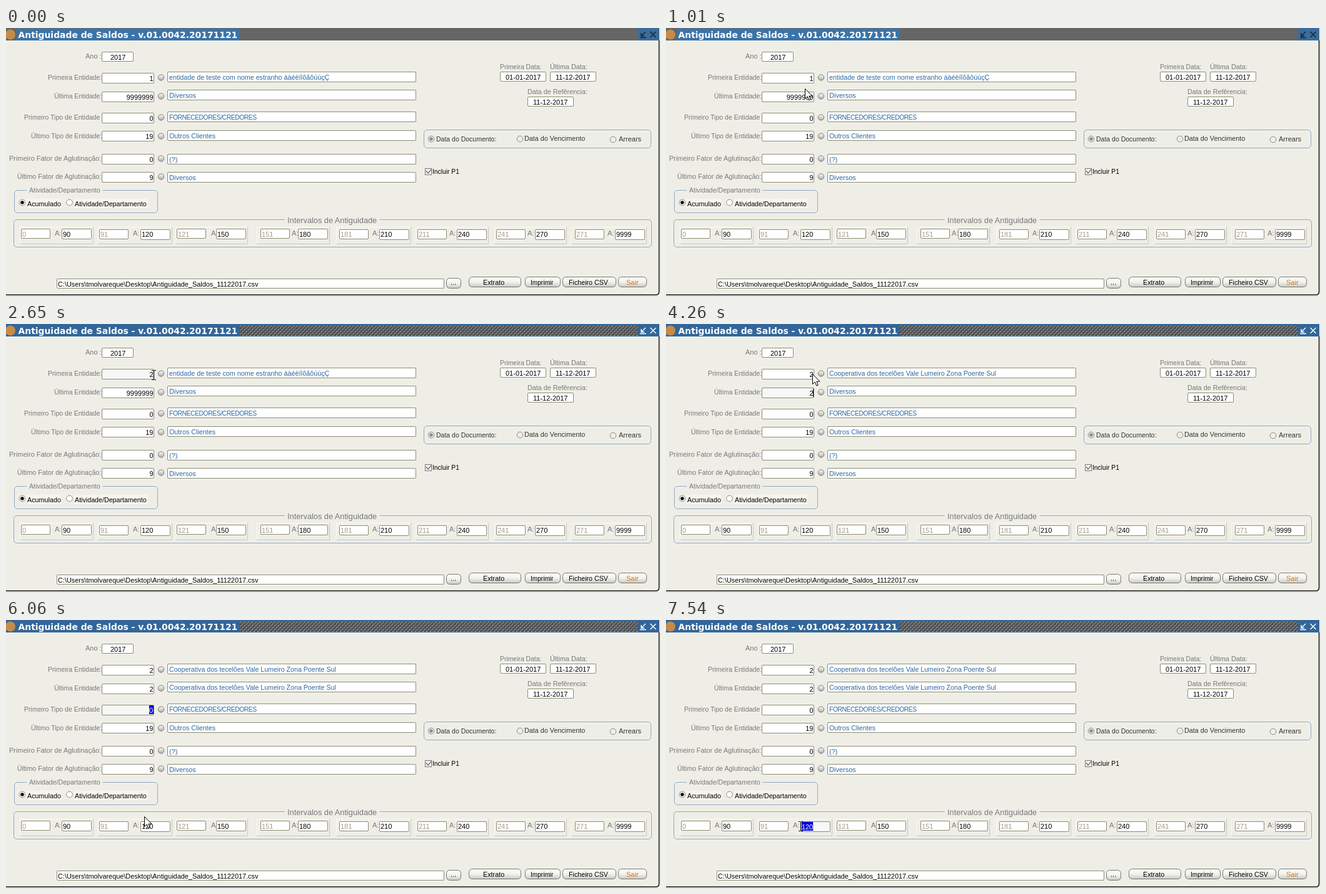
An HTML page that plays this animation: 1046 by 430 pixels, repeating every 8000 ms.

```html
<!DOCTYPE html>
<html lang="pt">
<head>
<meta charset="utf-8">
<title>Antiguidade de Saldos</title>
<style>
  html, body { margin: 0; width: 100%; height: 100%; overflow: hidden; background: #fff; }
  svg { display: block; width: 1046px; height: 430px; font-family: "Liberation Sans", Arial, sans-serif; }
  text { white-space: pre; }
  .title { font: bold 13.9px "DejaVu Sans", Verdana, sans-serif; }
  .caps { letter-spacing: -.4px; }
</style>
</head>
<body>
<svg id="stage" viewBox="0 0 1046 430"></svg>
<script>
const LOOP = 8000;
const LABEL = '#77777a', BLUE = '#2c68a4', BLACK = '#000', EDGE = '#8c8d76';
const FOCUS = '#f7f7f7', SELECT = '#0000dc', BG = '#efeee6', GROUP = '#8ea9c4';
const UNION = 'Cooperativa dos tecelões Vale Lumeiro Zona Poente Sul';

const text = (x, y, str, size = 11, fill = LABEL, more = '') =>
  `<text x="${x}" y="${y}" font-size="${size}" fill="${fill}" ${more}>${str}</text>`;
const rect = (x, y, w, h, fill, more = '') =>
  `<rect x="${x}" y="${y}" width="${w}" height="${h}" fill="${fill}" ${more}/>`;
const field = (x, y, w, h = 16, more = '') =>
  rect(x + .5, y + .5, w - 1, h - 1, '#fff', `rx="1.5" stroke="${EDGE}" ${more}`);
const numberText = (y, str, id = '', fill = BLACK) =>
  text(235.5, y, str, 11, fill, `text-anchor="end" ${id && `id="${id}"`}`);
const group = (x, y, w, h) =>
  rect(x + .5, y + .5, w - 1, h - 1, 'none', `rx="5" stroke="${GROUP}"`);
const radio = (x, y, dot, fill = '#fff') =>
  `<circle cx="${x}" cy="${y}" r="4.8" fill="${fill}" stroke="#8b8b8b"/>` +
  (dot ? `<circle cx="${x}" cy="${y}" r="2.8" fill="${dot}"/>` : '');
const button = (x, y, w, label, tx, size, fill = BLACK) =>
  rect(x + .5, y + .5, w - 1, 16, 'url(#button)', 'rx="5" stroke="#77776f"') +
  text(tx, 412, label, size, fill);
const selection = (id, x, y, w, str) =>
  `<g id="${id}" visibility="hidden">${rect(x, y, w, 14, SELECT)}${text(x, y + 12, str, 11, '#fff')}</g>`;

function titleBar() {
  return rect(0, 0, 1045, 20, '#666', 'id="bar"') +
    rect(374, 2, 637, 17, 'url(#bumps)', 'id="texture"') +
    rect(17, 1, 356, 19, '#3a74aa', 'id="strip"') +
    rect(1011, 0, 34, 20, '#3b6c9c', 'id="controls"') +
    '<circle cx="7" cy="10.5" r="8" fill="#c58b4c"/>' +
    text(19.5, 16, 'Antiguidade de Saldos - v.01.0042.20171121', 13.9, '#fff', 'class="title"') +
    '<path id="icons" d="M1023 6l-6 6M1016 8v5h5M1014 15.500h10M1030.500 6l9 9M1039.500 6l-9 9" fill="none" stroke-width="1.500"/>';
}

// label, x, size, label y, field y, number y, name field y, name y, number, name, name size
const rows = [
  ['Primeira Entidade:', 67, 10.5, 83, 72, 85, 70, 83, '1', 'entidade de teste com nome estranho áàéèíîõãôúùçÇ', 10.75],
  ['Última Entidade:', 77, 10.4, 113, 102, 115, 99, 112, '9999999', 'Diversos', 11],
  ['Primeiro Tipo de Entidade', 29, 10.55, 147, 136, 149, 134, 147, '0', 'FORNECEDORES/CREDORES', 10.3],
  ['Último Tipo de Entidade:', 40, 10.4, 177, 165, 178, 164, 177, '19', 'Outros Clientes', 10.75],
  ['Primeiro Fator de Aglutinação:', 5, 10.95, 213, 202, 215, 202, 215, '0', '(?)', 11],
  ['Último Fator de Aglutinação:', 18, 10.7, 242, 231, 244, 231, 244, '9', 'Diversos', 11]
];
const entityRow = ([label, lx, size, ly, fy, ny, nameTop, nameY, num, name, nameSize], i) =>
  text(lx, ly, label, size) +
  field(153, fy, 84, 17, `id="field${i}"`) + numberText(ny, num, 'num' + i) +
  `<circle cx="248" cy="${ly - 3.5}" r="4.6" fill="url(#knob)" stroke="#77776f"/>` +
  field(258, nameTop, 398, 17) +
  text(261, nameY, name, nameSize, BLUE, `id="name${i}" ${i === 2 ? 'class="caps"' : ''}`);

function dates() {
  return text(790, 66, 'Primeira Data:', 10.4) + text(870, 66, 'Última Data:', 10.9) +
    text(834, 106, 'Data de Refêrencia:', 10.8) +
    [[790, 70, '01-01-2017'], [870, 70, '11-12-2017'], [834, 110, '11-12-2017']]
      .map(([x, y, d]) => field(x, y, 74) + text(x + 9, y + 13, d, 11, BLACK)).join('');
}

function options() {
  return group(668, 163, 364, 30) +
    radio(680, 178, '#8d8d8d', BG) + text(688, 182, 'Data do Documento:', 10.5, '#333') +
    radio(822, 178, '', BG) + text(829, 181, 'Data do Vencimento', 10.8, '#333') +
    radio(971, 179, '', BG) + text(980, 182, 'Arrears', 11, '#333') +
    rect(670.5, 225.5, 10, 10, '#f7f7f2', 'stroke="#777"') +
    '<path d="M672 229l3 4 6-7" fill="none" stroke="#777" stroke-width="1.500"/>' +
    text(682, 234, 'Incluir P1', 10.3, BLACK) +
    group(13, 260, 230, 37) + rect(33, 258, 121, 6, BG) +
    text(37, 264, 'Atividade/Departamento', 10.6) +
    rect(33, 274, 55, 15, '#f6f5ef') + rect(109, 274, 117, 15, '#f6f5ef') +
    radio(26, 280, '#111') + text(34, 286, 'Acumulado', 10.8, BLACK) +
    radio(101.5, 280) + text(110, 286, 'Atividade/Departamento', 10.7, BLACK);
}

// panel left, start field, "A:" and end field
const spans = [
  [22, 24, 78, 89], [147, 149, 203, 215], [271, 273, 328, 336], [401, 407, 457, 467],
  [528, 533, 586, 597], [655, 658, 709, 721], [781, 784, 834, 846], [904, 910, 962, 974]
];
const limits = [0, 90, 120, 150, 180, 210, 240, 270, 9999];
function intervals() {
  return group(12, 307, 1021, 45) + rect(446, 304, 152, 8, BG) +
    text(450, 313, 'Intervalos de Antiguidade', 12.75) +
    spans.map(([left, from, mid, to], i) => {
      const y = i === 0 || i === 2 || i === 3 ? 322 : 323, right = to + 50;
      return `<path d="M${left}.500 346V319.500H${right}" fill="none" stroke="#fafaf6"/>` +
        `<path d="M${left} 346.500H${right}.500V319" fill="none" stroke="#c9c8c0"/>` +
        field(from, y, 47) +
        text(from + 2, 335, i ? limits[i] + 1 : 0, 11, '#a39a88') +
        text(mid, 333, 'A:') +
        field(to, y, 48, 17, `id="limit${i}"`) + text(to + 2, 335, limits[i + 1], 11, BLACK);
    }).join('');
}

function footer() {
  return field(81, 402, 620) +
    text(83, 415, 'C:\\Users\\tmolvareque\\Desktop\\Antiguidade_Saldos_11122017.csv', 10.9, BLACK) +
    button(704, 401, 24, '...', 711, 11) + button(740, 399, 84, 'Extrato', 763, 10.8) +
    button(830, 399, 57, 'Imprimir', 839, 10.1) + button(890, 399, 86, 'Ficheiro CSV', 900, 10.7) +
    button(979, 399, 46, 'Sair', 992, 11, '#d07818');
}

const defs = `<defs>
  <linearGradient id="button" x2="0" y2="1"><stop stop-color="#fff"/><stop offset=".5" stop-color="#f1f1ee"/><stop offset="1" stop-color="#c9c9c4"/></linearGradient>
  <linearGradient id="knob" x2="0" y2="1"><stop stop-color="#fff"/><stop offset="1" stop-color="#aaa"/></linearGradient>
  <pattern id="bumps" width="6" height="6" patternUnits="userSpaceOnUse">
    ${rect(0, 0, 6, 6, '#5c5f62')}${rect(0, 0, 2, 1, '#b4b7ba')}${rect(1, 1, 2, 1, '#222')}
    ${rect(3, 3, 2, 1, '#b4b7ba')}${rect(4, 4, 2, 1, '#222')}
  </pattern></defs>`;

const pointers =
  '<path id="arrow" d="M.500 .500V16.500L4.300 13 6.800 19 9.300 18 6.800 12.200H12Z" fill="#fff" stroke="#000"/>' +
  '<path id="beam" d="M-3 -7.500H0M1 -7.500H4M.500 -7V7M-3 7.500H0M1 7.500H4" fill="none" stroke="#000" stroke-width="1.200"/>';

const stage = document.getElementById('stage');
stage.innerHTML = defs + rect(0, 0, 1044, 428, BG) +
  '<path d="M0 428.200H1040Q1044.500 428 1044.500 423V20" fill="none" stroke="#111" stroke-width="1.500"/>' +
  titleBar() +
  text(127, 49, 'Ano :') + field(153, 38, 51) + text(167, 51, '2017', 11, BLACK) +
  rows.map(entityRow).join('') + dates() + options() + intervals() + footer() +
  selection('sel0', 229, 73, 7, '1') + selection('sel1', 193, 103, 43, '9999999') +
  selection('sel2', 229, 137, 7, '0') +
  [...'120'].map((d, i) => selection('digit' + i, 217 + 6 * i, 324, 6.2, d)).join('') +
  rect(235, 104, 1, 13, BLACK, 'id="caret"') + pointers;

const get = id => document.getElementById(id);
const show = (id, on) => get(id).setAttribute('visibility', on ? 'visible' : 'hidden');
const paint = (id, attr, value) => get(id).setAttribute(attr, value);
const within = (t, a, b) => t >= a && t < b;

// start, end, steps, pointer, from x y, to x y
const moves = [
  [70, 380, 5, 'arrow', 780, 338, 218, 140],
  [680, 1010, 5, 'arrow', 217, 154, 222, 97],
  [1090, 1400, 5, 'arrow', 223, 94, 227, 81],
  [1550, 1870, 5, 'beam', 230, 82, 236, 82],
  [3170, 3170, 1, 'arrow', 234, 80, 234, 80],
  [5190, 5660, 7, 'arrow', 234, 84, 221, 313],
  [6060, 6060, 1, 'arrow', 221, 315, 221, 315],
  [6130, 6400, 4, 'arrow', 226, 317, 250, 324],
  [6440, 6670, 4, 'beam', 250, 337, 238, 331],
  [6990, 6990, 1, 'arrow', 236, 330, 236, 330],
  [7210, 7540, 5, 'beam', 236, 331, 215, 331]
];

function pointerAt(t) {
  const move = moves.filter(m => m[0] <= t).pop();
  if (!move) return { kind: '', x: 0, y: 0 };
  const [start, end, steps, kind, x0, y0, x1, y1] = move;
  const gaps = steps - 1;
  const step = gaps ? Math.min(gaps, Math.floor((t - start) / (end - start) * gaps + .01)) : 0;
  const p = gaps ? step / gaps : 0, eased = p * p * (3 - 2 * p);
  return { kind, x: Math.round(x0 + (x1 - x0) * eased), y: Math.round(y0 + (y1 - y0) * eased) };
}

function draw(t) {
  const active = t >= 1550;
  paint('bar', 'fill', active ? '#336699' : '#666');
  paint('icons', 'stroke', active ? '#fff' : '#17222e');
  show('texture', active);
  show('strip', !active);
  show('controls', !active);

  get('num0').textContent = t < 2650 ? '1' : '2';
  get('num1').textContent = t < 4260 ? '9999999' : '2';
  get('name0').textContent = t < 3170 ? rows[0][9] : UNION;
  get('name1').textContent = t < 4650 ? rows[1][9] : UNION;
  paint('name0', 'font-size', t < 3170 ? rows[0][10] : 10.64);
  paint('name1', 'font-size', t < 4650 ? rows[1][10] : 10.64);

  const focus = [['field0', 1550, 3170], ['field1', 3170, 4730], ['field2', 4730, 6990], ['limit1', 6990, LOOP]];
  for (const [id, a, b] of focus) paint(id, 'fill', within(t, a, b) ? FOCUS : '#fff');
  show('sel0', within(t, 1700, 2650));
  show('sel1', within(t, 3170, 4260));
  show('sel2', within(t, 4730, 6990));
  show('caret', within(t, 4260, 4730));

  const { kind, x, y } = pointerAt(t);
  for (let i = 0; i < 3; i++) show('digit' + i, t >= 7210 && x < 220 + 6 * i);
  for (const id of ['arrow', 'beam']) {
    show(id, id === kind);
    paint(id, 'transform', `translate(${x} ${y})`);
  }
}

const origin = performance.now();
function tick() {
  draw((performance.now() - origin) % LOOP);
  requestAnimationFrame(tick);
}
tick();
</script>
</body>
</html>
```
